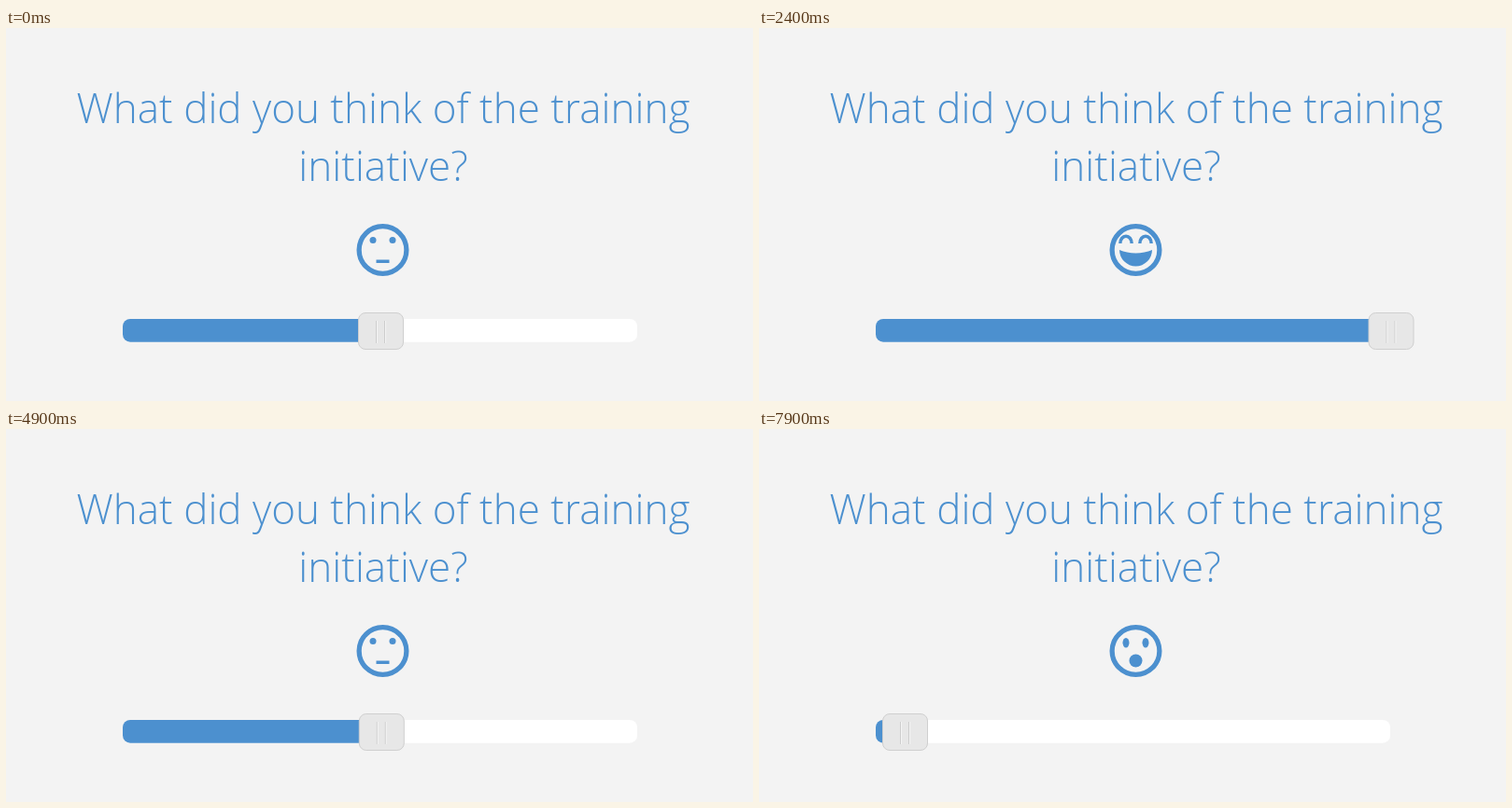
An HTML page for the animation above (8 s loop, 800 by 400 pixels).

```html
<!DOCTYPE html>
<html lang="en">
<head>
<meta charset="utf-8">
<title>Feedback slider</title>
<style>
  html, body { margin: 0; width: 100%; height: 100%; overflow: hidden; background: #f3f3f3; }
  svg { display: block; width: 800px; height: 400px; }
  text { font: 300 44px "Open Sans", sans-serif; text-anchor: middle; }
  .blue { fill: #4c90cf; }
  .line { fill: none; stroke: #4c90cf; }
</style>
</head>
<body>
<svg viewBox="0 0 800 400">
  <defs>
    <clipPath id="track"><rect x="125" y="312" width="551" height="24.7" rx="8"/></clipPath>
  </defs>
  <g class="blue">
    <text x="404" y="102">What did you think of the training</text>
    <text x="404" y="164">initiative?</text>
  </g>
  <g transform="translate(375.5 210) scale(1.75)">
    <circle class="line" cx="16" cy="16" r="14.5" stroke-width="3"/>
    <g id="face" class="blue"></g>
  </g>
  <g clip-path="url(#track)">
    <rect x="125" y="312" width="551" height="25" fill="#fff"/>
    <rect id="fill" class="blue" x="125" y="312" height="25"/>
  </g>
  <g id="handle">
    <rect x="-24" y="305.5" width="48" height="39" rx="7.5" fill="#e7e7e7" stroke="#cfcfcf"/>
    <path d="M-5 314v24M4 314v24" stroke="#cdcdcd"/>
    <path d="M-4 314v24M5 314v24" stroke="#f4f4f4"/>
  </g>
</svg>
<script>
const LOOP = 8000, STEP = 100;
const $ = id => document.getElementById(id);

// [time in ms, handle centre]
const keys = [
  [0, 401.5], [900, 529], [1600, 619], [1800, 639], [2400, 677], [2700, 672],
  [3200, 624.5], [3600, 564], [4300, 454.5], [4500, 430], [5000, 400.5],
  [5900, 400.5], [6000, 399], [6800, 315], [7700, 169.5], [7900, 156.5]
];

const eyes = ry => [10, 22].map(x =>
  `<ellipse cx="${x}" cy="${8 + ry}" rx="2" ry="${ry}"/>`).join("");
const shape = d => `<path d="${d}"/>`;
const openMouth = shape("M16 18C12.4 18 8.9 17.3 6 16a10 10 0 0 0 20 0C23.1 17.3 19.6 18 16 18z");

// From worst to best
const faces = [
  eyes(3) + '<circle cx="16" cy="22" r="4"/>',
  eyes(2) + shape("M10 24.4l-2.58-1.55a10 10 0 0 1 17.16 0L22 24.4a7 7 0 0 0-12 0z"),
  eyes(2) + shape("M23.3 18.8l.7 2.4-13.65 4-.7-2.4z"),
  eyes(2) + shape("M12 22h8v2h-8z"),
  eyes(2) + shape("M22 19.6l2.58 1.55a10 10 0 0 1-17.16 0L10 19.6a7 7 0 0 0 12 0z"),
  eyes(3) + openMouth,
  '<path class="line" stroke-width="2" d="M6.5 12a3.5 4.5 0 0 1 7 0M18.5 12a3.5 4.5 0 0 1 7 0"/>' + openMouth
];

const secant = i => (keys[i + 1][1] - keys[i][1]) / (keys[i + 1][0] - keys[i][0]);

// Harmonic mean of neighbouring speeds; rests at ends and turning points
function slope(i) {
  if (i === 0 || i === keys.length - 1) return 0;
  const a = secant(i - 1), b = secant(i);
  return a * b > 0 ? 2 * a * b / (a + b) : 0;
}

function centreAt(t) {
  let i = 0;
  while (i < keys.length - 2 && t >= keys[i + 1][0]) i++;
  const [t0, x0] = keys[i], [t1, x1] = keys[i + 1];
  const d = t1 - t0, u = (t - t0) / d, v = 1 - u;
  return x0 * v * v * (1 + 2 * u) + x1 * u * u * (1 + 2 * v)
    + d * u * v * (slope(i) * v - slope(i + 1) * u);
}

let mood;
function draw(now) {
  const t = Math.floor(now % LOOP / STEP) * STEP;
  const x = centreAt(t);
  const next = Math.max(0, Math.min(6, Math.round(3 + (x - 401) / 93)));
  $("handle").setAttribute("transform", `translate(${x} 0)`);
  $("fill").setAttribute("width", x - 125);
  if (next !== mood) $("face").innerHTML = faces[mood = next];
  requestAnimationFrame(draw);
}
draw(performance.now());
</script>
</body>
</html>
```
